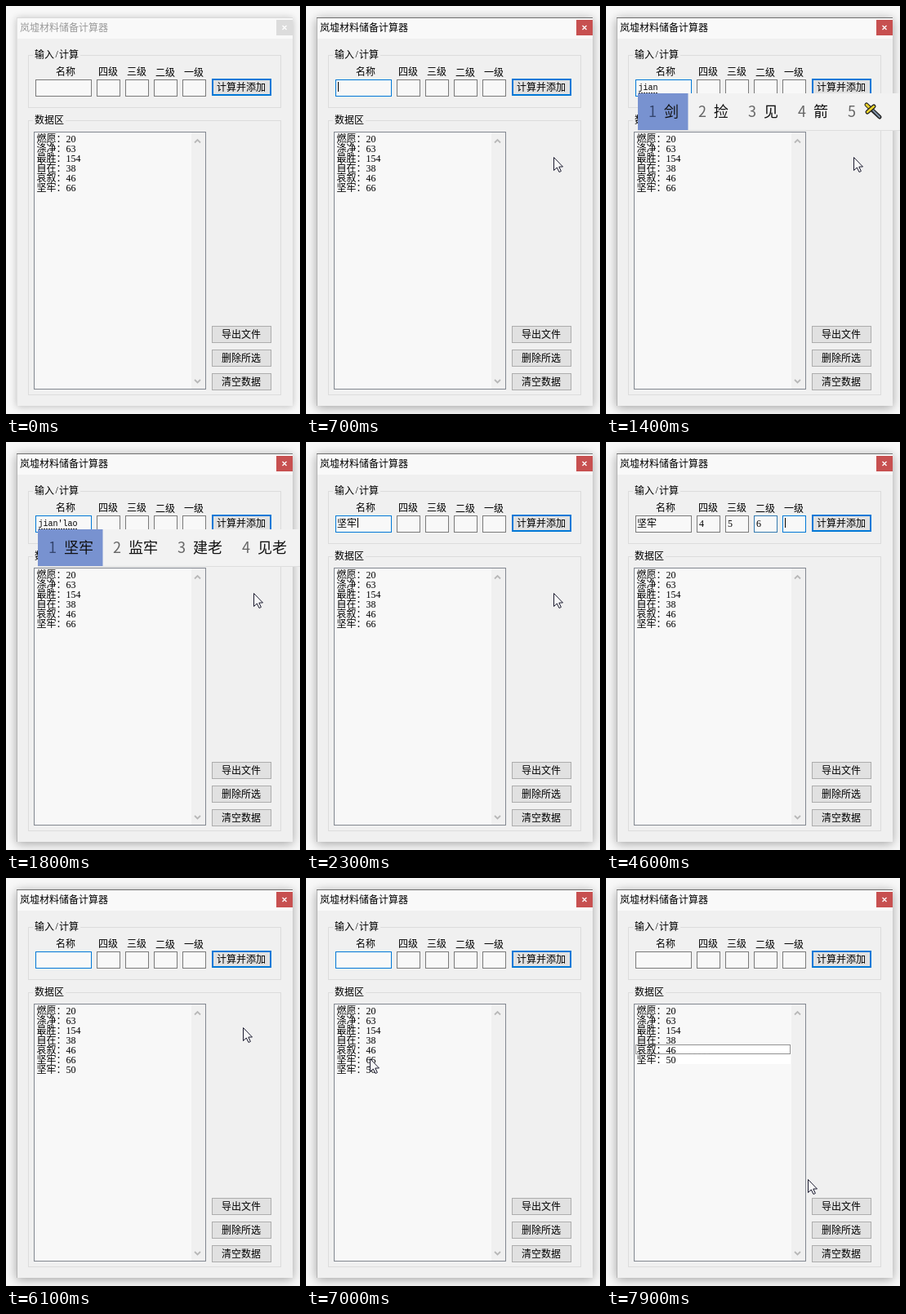
An HTML page for the animation above (8 s loop, 360 px wide and 500 px high).

```html
<!DOCTYPE html>
<html lang="zh-CN">
<head>
<meta charset="utf-8">
<style>
  html, body { margin: 0; width: 100%; height: 100%; overflow: hidden; background: #f8f8f8; }
  svg { display: block; position: absolute; left: 0; top: 0; }
  text { font: 12px "Liberation Serif", "Noto Sans CJK SC", "Noto Sans CJK", sans-serif; white-space: pre; }
  .mono { font: 10px "Liberation Mono", monospace; }
  .ime { font: 18px "Noto Sans CJK SC", "Noto Sans CJK", sans-serif; }
  #shadow { position: absolute; left: 13px; top: 14px; width: 338px; height: 476px; }
</style>
</head>
<body>
<div id="shadow"></div>
<svg id="stage" width="360" height="500" viewBox="0 0 360 500"></svg>
<script>
const LOOP = 8000, STEP = 100;
const BLUE = '#0078d7', GRAY = '#7a7a7a';
const stage = document.getElementById('stage');
const shadow = document.getElementById('shadow');

// Each table holds [start in ms, value].
const FOCUS = [[0, -1], [300, 0], [2700, 1], [3100, 2], [4300, 3], [4600, 4], [5500, 0], [7100, -1]];
const CARET = [[0, 0], [700, 39], [1200, 0], [2000, 87], [2300, 63], [2600, 114], [2800, 120], [3100, 149],
  [3300, 155], [3500, 0], [3900, 184], [4400, 190], [4500, 219], [4800, 225], [5000, 0], [5600, 39], [6100, 0]];
const PINYIN = [[0, ''], [1200, 'j'], [1300, 'jia'], [1400, 'jian'], [1500, "jian'l"],
  [1700, "jian'la"], [1800, "jian'lao"], [2300, '']];
const CANDIDATES = {
  'j': '就 将 叫 及 级', 'jia': '加 家 假 价 佳', 'jian': '剑 捡 见 箭 *',
  "jian'l": '建立 简历 见了 减了 间里', "jian'la": '捡啦 见啦 剪啦 减啦 建啦',
  "jian'lao": '坚牢 监牢 建老 见老 捡老'
};
const TYPED = [['坚牢', 2300], ['4', 2800], ['5', 3300], ['6', 4400], ['7', 4800]];
const FIELDS = [[36, 69, '名称', 61], [111, 29, '四级', 113], [146, 29, '三级', 148],
  [181, 29, '二级', 183], [216, 29, '一级', 218]];
const ROWS = ['燃愿：20', '涤净：63', '最胜：154', '自在：38', '哀叙：46', '坚牢：66'];
// Pointer tip; null while hidden.
const POINTER = [[0, null], [100, [343, 149]], [300, [338, 154]], [400, [327, 163]], [500, [315, 175]],
  [600, [306, 183]], [700, [303, 185]], [2600, null], [5500, [290, 183]], [7100, [78, 221]],
  [7400, [82, 224]], [7500, [92, 229]], [7700, [126, 260]], [7800, [205, 334]], [7900, [247, 369]]];

const at = (table, t) => table.filter(([start]) => start <= t).pop()[1];
const text = (x, y, s, fill = '#000', cls = '') => `<text x="${x}" y="${y}" fill="${fill}" class="${cls}">${s}</text>`;
const fillRect = (x, y, w, h, fill) => `<rect x="${x}" y="${y}" width="${w}" height="${h}" fill="${fill}"/>`;
const box = (x, y, w, h, fill, stroke, extra = '') =>
  `<rect x="${x + .5}" y="${y + .5}" width="${w - 1}" height="${h - 1}" fill="${fill}" stroke="${stroke}" ${extra}/>`;
const line = (d, stroke, width = 1) => `<path d="${d}" fill="none" stroke="${stroke}" stroke-width="${width}"/>`;

function frame(active) {
  return fillRect(13, 14, 338, 476, '#f0f0f0') + fillRect(14, 15, 337, 25, '#f9f9f9') +
    line('M13.5 490V14', active ? '#b4b4b4' : '#e0e0e0') +
    line('M13 14.5H351', active ? '#707070' : '#dadada') +
    text(17, 31, '岚墟材料储备计算器', active ? '#000' : '#999') +
    fillRect(331, 17, 20, 19, active ? '#c75050' : '#dcdcdc') +
    line('M338.5 24l5 5m0-5l-5 5', '#fff', 1.3);
}

function group(y, h, labelWidth, label) {
  return box(27, y, 310, h, 'none', '#dcdcdc') + fillRect(33, y - 2, labelWidth + 4, 5, '#f0f0f0') + label;
}

function button(y, label, x, primary) {
  const face = primary
    ? `<rect x="253" y="${y + 1}" width="71" height="19" fill="#e1e1e1" stroke="${BLUE}" stroke-width="2"/>`
    : box(252, y, 73, 21, '#e1e1e1', '#adadad');
  return face + text(x, y + 15, label);
}

function fields(t) {
  const focus = at(FOCUS, t);
  return FIELDS.map(([x, w, label, labelX], i) => {
    const fading = i === 3 && t >= 4600 && t < 4800;
    const border = i === focus ? BLUE : fading ? '#347ab0' : GRAY;
    const [value, start] = TYPED[i];
    return text(labelX, i > 2 ? 86 : 85, label) + box(x, 90, w, 21, '#f8f8f8', border) +
      (t >= start && t < 5400 ? text(x + (i ? 3 : 2), 104, value) : '');
  }).join('');
}

function list(t) {
  const rows = ROWS.slice();
  if (t >= 5400) rows.push('坚牢：50');
  const removed = t >= 7400, selected = t >= 7100 && !removed;
  if (removed) rows.splice(5, 1);
  let out = box(34, 154, 211, 316, '#f8f8f8', '#828790') + fillRect(227, 155, 17, 314, '#f0f0f0') +
    line('M231 167.500l3.500-3.500 3.500 3.500M231 458l3.500 3.500 3.500-3.500', '#b8b8b8', 1.8);
  if (removed) out += fillRect(36, 204, 190, 24, '#fff');
  if (selected) out += fillRect(36, 216, 190, 12, BLUE);
  out += rows.map((row, i) => text(37.500, 166.500 + i * 12, row, selected && i === 5 ? '#fff' : '#000')).join('');
  if (removed || selected)
    out += box(36, removed ? 204 : 216, 190, 12, 'none', removed ? '#222' : '#ff8728', 'stroke-dasharray="1 1"');
  return out;
}

function dagger(x, y) {
  return `<g transform="translate(${x} ${y})" stroke-linecap="round">` +
    line('M2 2L18 17', '#222', 5) + line('M9 8L18 17', '#7d8fa6', 2) + line('M2 2L7 7', '#e8cf2a', 3) +
    line('M3 11L11 4', '#222', 5) + line('M3 11L11 4', '#efd62e', 2.5) + '</g>';
}

function ime(t) {
  const typed = at(PINYIN, t);
  if (!typed) return '';
  const words = CANDIDATES[typed].split(' ');
  const pitch = 43 + 18 * words[0].length;
  return text(39.500, 103, typed, '#000', 'mono') +
    line(`M40 106.500h${typed.length * 6 - 1}`, '#333').replace('/>', ' stroke-dasharray="2 1"/>') +
    fillRect(39, 107, 321, 45, '#f2f2f2') + fillRect(39, 107, pitch + .5, 45, '#7892d0') +
    line('M39 152.500H360', '#dedede') +
    words.map((word, i) => {
      const x = 39 + i * pitch;
      return text(x + 13, 136, i + 1, i ? '#666' : '#35466f', 'ime') +
        (word === '*' ? dagger(x + 34, 119) : text(x + 32, 136, word, '#111', 'ime'));
    }).join('');
}

function pointer(t) {
  let tip = at(POINTER, t);
  if (t >= 6100 && t < 7100) {
    const p = Math.min(1, (t - 6100) / 800), e = p * p * (3 - 2 * p);
    tip = [290 - 212 * e, 183 + 38 * e];
  }
  return tip ? `<path transform="translate(${tip.map(Math.round)})" d="M.5 .5V16.500L4.300 13L7 18.500L9.400 17.400L6.800 12H11.500Z"
    fill="#f8f8f8" stroke="#1c1c30"/>` : '';
}

function draw(t) {
  const active = t >= 300, caret = at(CARET, t);
  shadow.style.boxShadow = active ? '0 2px 12px rgba(0,0,0,.36)' : '0 1px 9px rgba(0,0,0,.24)';
  stage.innerHTML = frame(active) +
    group(60, 65, 54, text(35, 64, '输入') + text(60.500, 63, '/') + text(65, 64, '计算')) +
    group(140, 337, 36, text(35, 144, '数据区')) +
    fields(t) + button(89, '计算并添加', 258, true) + list(t) +
    button(392, '导出文件', 264) + button(421, '删除所选', 264) + button(450, '清空数据', 264) +
    (caret ? fillRect(caret, 93, 1, 12, '#000') : '') + ime(t) + pointer(t);
}

const begin = performance.now();
let shown = -1;
function tick() {
  const t = Math.floor((performance.now() - begin) % LOOP / STEP) * STEP;
  if (t !== shown) draw(shown = t);
  requestAnimationFrame(tick);
}
tick();
</script>
</body>
</html>
```
